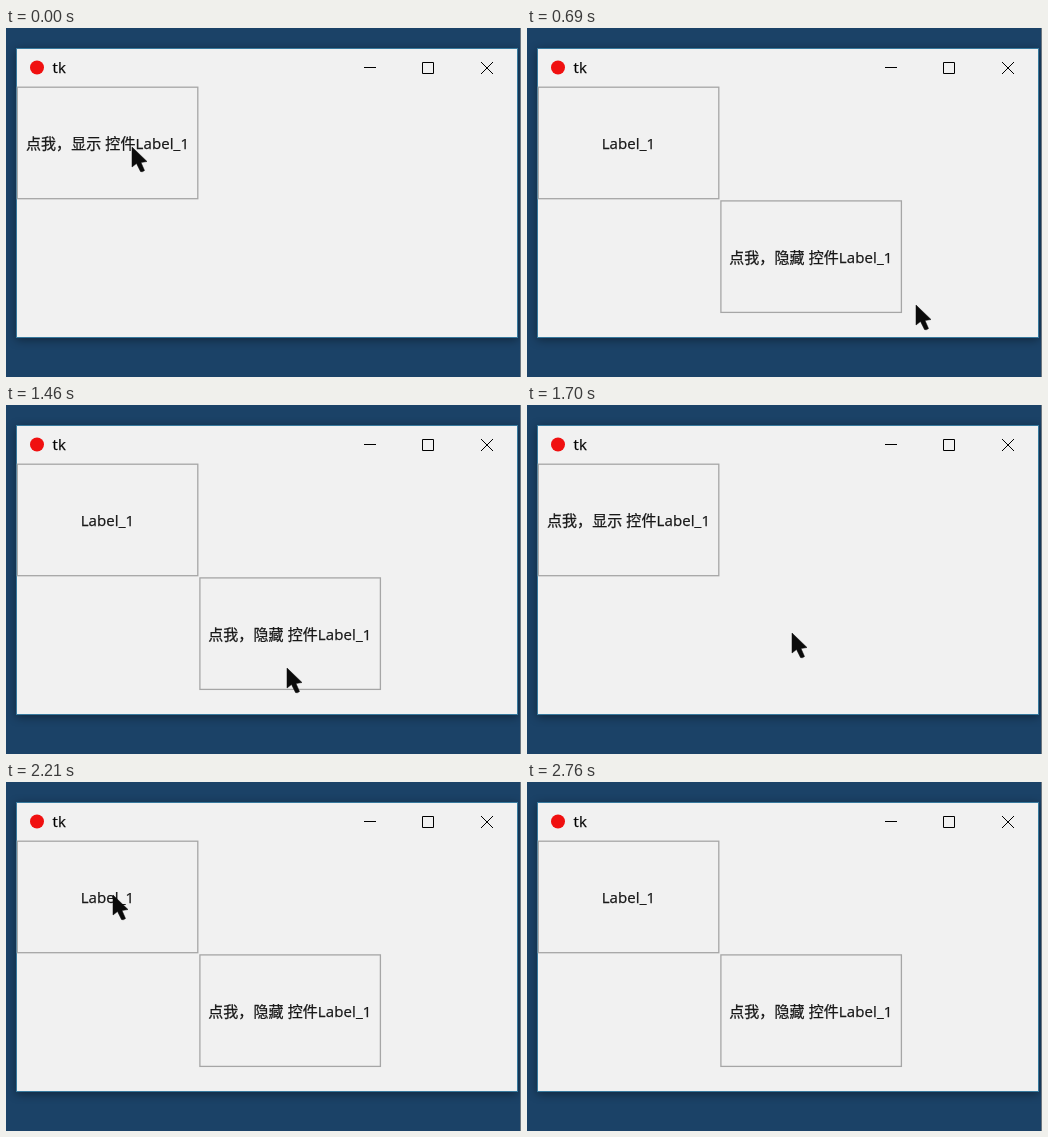
An HTML page for the animation above (3040 ms loop, 515 by 349 pixels).

```html
<!DOCTYPE html>
<html lang="zh">
<head>
<meta charset="utf-8">
<title>tk</title>
<style>
  html, body { margin: 0; width: 100%; height: 100%; overflow: hidden; background: #1b4267; }
  svg { display: block; }
  text {
    font: 15px "Open Sans", "Noto Sans CJK SC", "Noto Sans CJK", sans-serif;
    letter-spacing: .1px; text-anchor: middle;
    fill: #181818; stroke: #181818; stroke-width: .25px;
  }
  .title { text-anchor: start; fill: #000; }
  .window { fill: #f1f1f1; stroke: #38799d; filter: drop-shadow(0 2px 5px #0006); }
  .box { fill: none; stroke: #a6a6a6; stroke-width: 1.3px; width: 180.5px; height: 111.5px; }
  .controls { fill: none; stroke: #000; }
</style>
</head>
<body>
<svg width="515" height="349" viewBox="0 0 515 349">
  <rect class="window" x="10.5" y="20.5" width="501" height="289"/>
  <path d="M514.5 0V349" stroke="#6b7680"/>
  <circle cx="31" cy="39.5" r="7" fill="#f01010"/>
  <text class="title" x="46.5" y="45">tk</text>
  <path class="controls" d="M358 39.5h12M416.5 34.5h11v11h-11zM475 34l12 12M487 34l-12 12"/>

  <rect class="box" x="11.3" y="59.2"/>
  <text id="label" x="101.5" y="121"></text>
  <g id="hideButton">
    <rect class="box" x="193.9" y="172.9"/>
    <text x="283.8" y="235">点我，隐藏 控件Label_1</text>
  </g>
  <path id="cursor" fill="#0b0b0b" stroke="#0b0b0b" stroke-width=".5"
    d="M0 0V20L4.5 16.5 8.5 24.5Q10 25.5 12.5 23.5L9 15.5 15 14.5Z"/>
</svg>
<script>
const LOOP = 3040, STEP = 130;

// Pointer moves; each holds its last position until the next one starts.
const strokes = [
  { start: 0, end: 270, from: [126, 119], to: [120, 117] },
  { start: 550, end: 810, from: [409, 328], to: [382, 260] },
  { start: 1460, end: 1700, from: [281, 263], to: [265, 228] },
  { start: 1820, end: 2210, from: [190, 172], to: [107, 113] },
  { start: 2330, end: 2610, from: [126, 124], to: [428, 272] }
];
const [label, hideButton, cursor] =
  ["label", "hideButton", "cursor"].map(id => document.getElementById(id));
const show = (el, on) => el.setAttribute("visibility", on ? "visible" : "hidden");
const within = (t, start, end) => t >= start && t < end;

function pointerAt(t) {
  const { start, end, from, to } = strokes.findLast(s => s.start <= t);
  const steps = Math.round((end - start) / STEP);
  const done = Math.min(1, Math.floor((t - start) / (end - start) * steps + 1e-6) / steps);
  const eased = 1 - (1 - done) ** 2;
  return from.map((v, i) => Math.round(v + (to[i] - v) * eased));
}

function draw(now) {
  const t = now % LOOP;
  const open = within(t, 150, 1580) || t >= 2090;
  label.textContent = open ? "Label_1" : "点我，显示 控件Label_1";
  show(hideButton, open);
  show(cursor, t < 930 || within(t, 1460, 2760));
  cursor.setAttribute("transform", `translate(${pointerAt(t)})`);
}

let begin;
function tick(now) {
  begin ??= now;
  draw(now - begin);
  requestAnimationFrame(tick);
}
draw(0);
requestAnimationFrame(tick);
</script>
</body>
</html>
```
